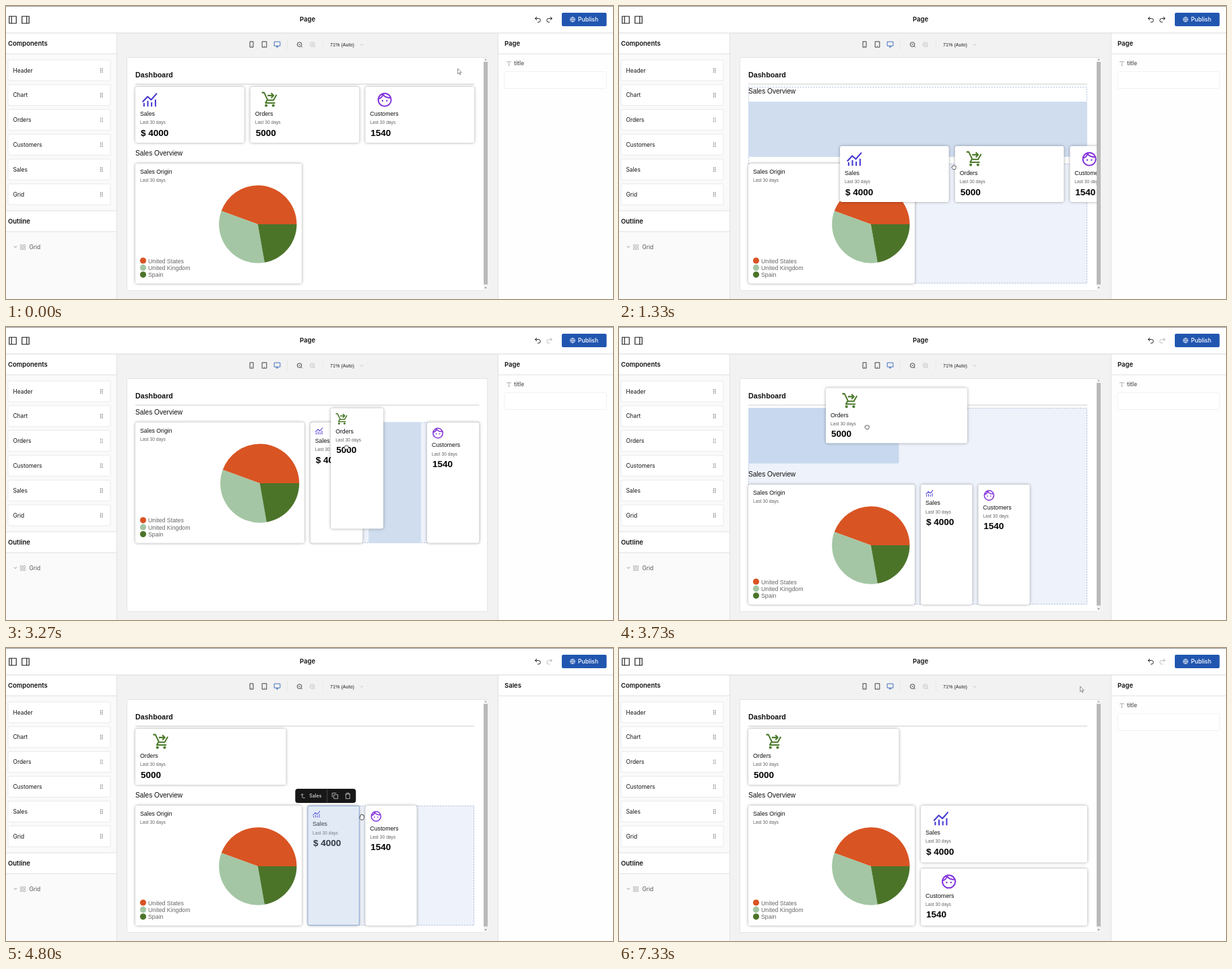
Animation, 901 px wide and 435 px high, one loop 7.54 s. Source, as an HTML page with a canvas:

```html
<!DOCTYPE html>
<html lang="en">
<head>
<meta charset="utf-8">
<title>Page editor</title>
<style>
html, body { margin: 0; width: 100%; height: 100%; overflow: hidden; background: #fff; }
canvas { display: block; width: 901px; height: 435px; }
</style>
</head>
<body>
<canvas id="stage"></canvas>
<script>
const LOOP = 7540;
const canvas = document.getElementById('stage');
const ratio = window.devicePixelRatio || 1;
canvas.width = Math.round(901 * ratio);
canvas.height = Math.round(435 * ratio);
const ctx = canvas.getContext('2d');
ctx.scale(ratio, ratio);

const UI = 'Inter, sans-serif';
const SITE = '"Liberation Sans", Arial, sans-serif';
const LEFT = 192, GAP = 9;

// Drawing helpers
function fill(x, y, w, h, color, radius = 0) {
  ctx.fillStyle = color;
  ctx.beginPath();
  ctx.roundRect(x, y, w, h, radius);
  ctx.fill();
}

function outline(x, y, w, h, color, radius = 0, width = 1, dash = []) {
  ctx.strokeStyle = color;
  ctx.lineWidth = width;
  ctx.setLineDash(dash);
  ctx.beginPath();
  ctx.roundRect(x, y, w, h, radius);
  ctx.stroke();
  ctx.setLineDash([]);
}

function disc(x, y, r, color) {
  ctx.fillStyle = color;
  ctx.beginPath();
  ctx.arc(x, y, r, 0, Math.PI * 2);
  ctx.fill();
}

// y is the middle of the capital letters
function text(string, x, y, size, { color = '#111', weight = 400, font = UI, align = 'left' } = {}) {
  ctx.font = `${weight} ${size}px ${font}`;
  ctx.fillStyle = color;
  ctx.textAlign = align;
  ctx.fillText(string, x, y + size * 0.36);
}

// Icons live on a 24 unit grid, centred on x, y
function icon(path, x, y, size, color, width = 2, inside) {
  ctx.save();
  ctx.translate(x - size / 2, y - size / 2);
  ctx.scale(size / 24, size / 24);
  ctx.lineJoin = 'round';
  if (inside) {
    ctx.fillStyle = inside;
    ctx.fill(new Path2D(path));
  }
  ctx.strokeStyle = color;
  ctx.lineWidth = width;
  ctx.stroke(new Path2D(path));
  ctx.restore();
}

const ICON = {
  panelLeft: 'M3 3h18v18H3zM9 3v18',
  panelRight: 'M3 3h18v18H3zM15 3v18',
  undo: 'M9 14L4 9l5-5M4 9h10a5.5 5.5 0 0 1 0 11h-3',
  redo: 'M15 14l5-5-5-5M20 9H10a5.5 5.5 0 0 0 0 11h3',
  globe: 'M2 12a10 10 0 1 0 20 0a10 10 0 1 0-20 0h20M12 2c-5 6-5 14 0 20c5-6 5-14 0-20',
  phone: 'M6 2h12v20H6zM11 18h2',
  tablet: 'M4 2h16v20H4zM11 18h2',
  monitor: 'M2 3h20v14H2zM8 21h8M12 17v4',
  zoomOut: 'M3 11a8 8 0 1 0 16 0a8 8 0 1 0-16 0M21 21l-4-4M8 11h6',
  zoomIn: 'M3 11a8 8 0 1 0 16 0a8 8 0 1 0-16 0M21 21l-4-4M8 11h6M11 8v6',
  down: 'M6 9l6 6 6-6',
  grid: 'M3 3h7v7H3zM14 3h7v7h-7zM14 14h7v7h-7zM3 14h7v7H3z',
  type: 'M4 7V4h16v3M9 20h6M12 4v16',
  hash: 'M4 9h16M4 15h16M10 3L8 21M16 3l-2 18',
  parent: 'M14 9L9 4 4 9M20 20h-7a4 4 0 0 1-4-4V4',
  copy: 'M8 8h14v14H8zM4 16H2V2h14v2',
  trash: 'M3 6h18M19 6v16H5V6M8 6V2h8v4',
  chart: 'M4 21.5v-5M9.3 21.5v-8M14.6 21.5v-6M20 21.5v-10M2 15L9 7.5l5 4.5L22 3',
  cart: 'M1 2h3.2l5 10.5h8L21.5 5M8.3 12.5L6.2 16.5H19.5M9 6h8M14 2.6l3.4 3.4-3.4 3.4M6 20a1 1 0 1 0 2 0a1 1 0 1 0-2 0M16 20a1 1 0 1 0 2 0a1 1 0 1 0-2 0',
  face: 'M3 12a9 9 0 1 0 18 0a9 9 0 1 0-18 0M4 10.5c2.5-.8 4.7-3 5.7-6M9.7 4.5c2 3.5 5 5 10.3 4.5M8 13.3h2M14 13.3h2',
  arrow: 'M5 1v19l4.5-4 3 7 3-1.5-3-6.5h6z',
  hand: 'M3 13l2-2 2 2V5h3V3h4v1h3v2h3v10l-3 6H9z',
  fist: 'M4 12l3-1V8l3-1h4l3 1 3 1v7l-3 5H9l-4-5z',
  beam: 'M8 2l4 2 4-2M12 4v16M8 22l4-2 4 2',
};

// Timeline
const DRAG_ROW = [740, 1800], DRAG_ORDERS = [2980, 4000];
const within = (t, [from, to]) => t >= from && t < to;

const POINTER = [
  [0, 671, 93], [70, 671, 93], [460, 480, 165], [740, 361, 151], [870, 361, 151],
  [1330, 497, 239], [1560, 572, 244], [1800, 572, 240], [2200, 508, 231], [2530, 508, 231],
  [2900, 561, 200], [3000, 561, 200], [3330, 500, 176], [3730, 368, 148], [4000, 262, 172],
  [4130, 262, 172], [4700, 524, 250], [4800, 528, 251], [4930, 528, 251], [5200, 441, 219],
  [5300, 441, 219], [5650, 765, 112], [5800, 765, 122], [6670, 765, 122], [7130, 685, 57], [LOOP, 685, 57],
];

function pointerAt(t) {
  const i = POINTER.findIndex(p => p[0] > t);
  const [t0, x0, y0] = POINTER[i - 1], [t1, x1, y1] = POINTER[i];
  const u = (t - t0) / (t1 - t0), k = u * u * (3 - 2 * u);
  return { x: x0 + (x1 - x0) * k, y: y0 + (y1 - y0) * k };
}

function selectionAt(t) {
  if (within(t, [2150, 2950]) || within(t, [4650, 5250])) return 'Sales';
  return within(t, [5250, 7130]) ? 'Grid' : 'Page';
}

const columnsAt = t => t < 5950 ? 3 : t < 6400 ? 2 : 1;

// Site content
const STATS = {
  Sales: { icon: ICON.chart, color: '#4438d2', value: '$ 4000', share: 0.2 },
  Orders: { icon: ICON.cart, color: '#4b7a2b', value: '5000', share: 0.3 },
  Customers: { icon: ICON.face, color: '#8434dc', value: '1540', share: 0.3 },
};

function panel(x, y, w, h) {
  ctx.save();
  ctx.shadowColor = 'rgba(0,0,0,.36)';
  ctx.shadowBlur = 4 * ratio;
  fill(x, y, w, h, '#fff', 3);
  ctx.restore();
}

function stat(name, { x, y, w, h }) {
  const { icon: path, color, value, share } = STATS[name];
  const slot = share * (w - 13), size = Math.min(25.5, slot), base = y + size;
  panel(x, y, w, h);
  icon(path, x + 6.5 + slot / 2, y + 6.5 + size / 2, size, color, 1.9);
  text(name, x + 7, base + 14.5, 8.75, { font: SITE });
  text('Last 30 days', x + 7, base + 27.5, 6.7, { font: SITE, color: '#666' });
  text(value, x + 8, base + 42.5, 13.5, { font: SITE, weight: 700, color: '#000' });
}

function pieCard(x, y, w, h) {
  panel(x, y, w, h);
  text('Sales Origin', x + 7, y + 12, 8.75, { font: SITE });
  text('Last 30 days', x + 7, y + 25, 6.7, { font: SITE, color: '#666' });
  const slices = [['United States', 160, '#d95423'], ['United Kingdom', 120, '#a4c6a4'], ['Spain', 80, '#4b7429']];
  const r = w * 0.2335, cx = x + w - 7.5 - r, cy = y + h / 2 + 1;
  let angle = 0;
  slices.forEach(([name, degrees, color], i) => {
    const end = angle - degrees * Math.PI / 180;
    ctx.fillStyle = color;
    ctx.beginPath();
    ctx.moveTo(cx, cy);
    ctx.arc(cx, cy, r, angle, end, true);
    ctx.fill();
    angle = end;
    const row = y + h - 34 + i * 10.4;
    disc(x + 11.5, row, 4.6, color);
    text(name, x + 19, row + 0.5, 8.8, { font: SITE, color: '#666' });
  });
}

function cells(x, y, w, h, columns, count) {
  const cw = (w - GAP * (columns - 1)) / columns;
  const rows = Math.ceil(count / columns), ch = (h - GAP * (rows - 1)) / rows;
  return Array.from({ length: count }, (_, i) => ({
    x: x + (i % columns) * (cw + GAP), y: y + Math.floor(i / columns) * (ch + GAP), w: cw, h: ch,
  }));
}

const holds = (box, p) => p.x >= box.x && p.x <= box.x + box.w && p.y >= box.y && p.y <= box.y + box.h;

function zone(x, y, w, h, filled = true) {
  if (filled) fill(x, y, w, h, '#eef2fa');
  outline(x + 0.5, y + 0.5, w - 1, h - 1, '#a3b7d6', 0, 0.9, [2, 2]);
}

function highlight({ x, y, w, h }) {
  fill(x, y, w, h, 'rgba(158,185,222,.3)', 2);
  outline(x, y + 0.5, w, h - 1, '#8fabd9', 2);
}

function actionBar(label, box) {
  const right = box.x + box.w - 5, y = box.y - 25;
  const width = label === 'Sales' ? 90 : 86, x = right - width, mid = y + 10.5;
  fill(x, y, width, 21, '#171717', 4);
  icon(ICON.parent, x + 11.5, mid, 9, '#ddd');
  text(label, x + 21, mid, 7, { color: '#ddd', weight: 500 });
  fill(right - 43, y + 1, 0.8, 19, '#555');
  icon(ICON.copy, right - 31, mid, 10, '#ccc');
  icon(ICON.trash, right - 12, mid, 10, '#ccc');
}

function site(t, pointer, selected) {
  const movingRow = within(t, DRAG_ROW), movingOrders = within(t, DRAG_ORDERS);
  const compact = within(t, [1500, 3420]);
  const below = within(t, [1060, 1500]);
  const right = compact ? 702.5 : 695, full = right - LEFT;
  const half = (full - GAP) / 2;
  const top = compact ? 141.4 : 234, height = compact ? 179.4 : 178;
  const inner = { x: LEFT + half + GAP, y: top, w: half, h: height };
  const names = Object.keys(STATS);

  fill(179, 76, 536, 347, '#fff');
  outline(179.5, 76.5, 535, 346, '#e4e4e4');
  ctx.save();
  ctx.beginPath();
  ctx.rect(179, 76, compact ? 536 : 530, 347);
  ctx.clip();

  text('Dashboard', LEFT, 102, 10.7, { font: SITE, weight: 700 });
  fill(LEFT, 115.5, full, 1, '#ccc');

  const dragging = movingRow || movingOrders;
  if (dragging && !compact) zone(LEFT, 120, full, 292, !below);
  if (below || (movingRow && compact)) zone(LEFT, top, full, height);
  const overInner = t > 1800 && (selected === 'Grid' || holds(inner, pointer));
  if (overInner && !(movingOrders && !compact)) {
    if (selected === 'Grid') fill(inner.x, inner.y, inner.w, inner.h, '#e9eff9');
    else zone(inner.x, inner.y, inner.w, inner.h);
  }

  text('Sales Overview', LEFT, compact || below ? 126.3 : 218, 10.1, { font: SITE });
  pieCard(LEFT, top, half, height);

  const slot = '#cfddef';
  let shown = [];
  if (t < DRAG_ROW[0]) {
    shown = cells(LEFT, 120, full, 83, 3, 3).map((box, i) => [names[i], box]);
  } else if (movingRow) {
    if (compact) fill(inner.x, inner.y, inner.w, inner.h, slot, 2);
    else fill(LEFT, below ? 142 : 120, full, 82, slot);
  } else if (compact) {
    shown = cells(inner.x, inner.y, inner.w, inner.h, 3, 3).map((box, i) => [names[i], box]);
    if (movingOrders) {
      const { x, y, w, h } = shown.splice(1, 1)[0][1];
      fill(x, y, w, h, slot, 2);
    }
  } else {
    const boxes = cells(inner.x, inner.y, inner.w, inner.h, columnsAt(t), 2);
    shown = [['Sales', boxes[0]], ['Customers', boxes[1]]];
    if (movingOrders) fill(LEFT, 120, 223.5, 82.5, '#c8d8ee', 2);
    else shown.push(['Orders', { x: LEFT, y: 120, w: 223.5, h: 83 }]);
  }
  shown.forEach(([name, box]) => stat(name, box));

  if (!dragging && selected === 'Page') {
    const hovered = shown.find(([, box]) => holds(box, pointer));
    if (hovered) highlight(hovered[1]);
  }
  if (selected === 'Sales') {
    const box = shown.find(([name]) => name === 'Sales')[1];
    highlight(box);
    actionBar('Sales', box);
  } else if (selected === 'Grid') {
    outline(inner.x + 0.5, inner.y + 0.5, inner.w - 1, inner.h - 1, '#8fabd9');
    actionBar('Grid', inner);
  }

  if (movingRow) {
    const dx = compact ? 84 : 169;
    cells(pointer.x - dx, pointer.y - 31, compact ? half : full, compact ? height : 83, 3, 3)
      .forEach((box, i) => stat(names[i], box));
  }
  if (movingOrders) {
    const [dx, w, h] = compact ? [23, 78, 179] : [61, 210, 82];
    stat('Orders', { x: pointer.x - dx, y: pointer.y - 57.5, w, h });
  }
  ctx.restore();

  if (!compact) {
    fill(709, 77, 6, 346, '#f4f4f4');
    fill(709, 83, 6, 330.5, '#b9b9b9');
    icon('M4 16h16l-8-9z', 712, 79.5, 4, '#888', 1, '#888');
    icon('M4 8h16l-8 9z', 712, 418.5, 4, '#555', 1, '#555');
  }
}

// Editor frame around the site
function header(t) {
  fill(0, 0, 901, 40, '#fff');
  fill(0, 0, 901, 1, '#999');
  fill(0, 39.5, 901, 1, '#dcdcdc');
  icon(ICON.panelLeft, 10, 20.5, 14, '#222');
  icon(ICON.panelRight, 29, 20.5, 14, '#222');
  text('Page', 447.5, 20, 9.5, { weight: 600, align: 'center' });
  icon(ICON.undo, 789.5, 20, 12, '#222');
  icon(ICON.redo, 806.5, 20, 12, t < DRAG_ROW[1] ? '#222' : '#bbb');
  fill(825, 10, 66.5, 20, '#2156b0', 2);
  icon(ICON.globe, 841, 20, 8.5, '#fff');
  text('Publish', 849, 20, 8.6, { color: '#fff', weight: 500 });
}

function toolbar() {
  icon(ICON.phone, 364.5, 57, 10, '#222');
  icon(ICON.tablet, 383.5, 57, 10, '#222');
  icon(ICON.monitor, 402.5, 57, 10.5, '#2e62b8');
  fill(417, 49, 1, 16, '#e9e9e9');
  icon(ICON.zoomOut, 436, 57.5, 10, '#222');
  icon(ICON.zoomIn, 455, 57.5, 10, '#bbb');
  fill(470, 49, 1, 16, '#e9e9e9');
  text('71% (Auto)', 481, 57.5, 7.2, { font: SITE, color: '#222' });
  icon(ICON.down, 528, 57.5, 8, '#aaa');
}

function sidebar() {
  fill(0, 40.5, 164, 394.5, '#fafafa');
  fill(164, 40.5, 1, 394.5, '#e2e2e2');
  fill(0, 40.5, 164, 30, '#fff');
  fill(0, 70.5, 164, 1, '#e2e2e2');
  text('Components', 3, 55.5, 9.5, { weight: 600 });
  ['Header', 'Chart', 'Orders', 'Customers', 'Sales', 'Grid'].forEach((name, i) => {
    const y = 80 + i * 36.8;
    fill(3, y, 152, 31, '#fff', 2);
    outline(3, y, 152, 31, '#eaeaea', 2);
    text(name, 10.5, y + 15.5, 8.4);
    for (let k = 0; k < 6; k++) disc(140.5 + (k % 2) * 2.5, y + 13 + Math.floor(k / 2) * 2.5, 0.7, '#555');
  });
  fill(0, 303.5, 164, 31, '#fff');
  fill(0, 303.5, 164, 1, '#e2e2e2');
  fill(0, 334.5, 164, 1, '#e2e2e2');
  text('Outline', 3, 320, 9.5, { weight: 600 });
  icon(ICON.down, 14, 357.5, 8, '#555');
  icon(ICON.grid, 25, 358, 9.5, '#aaa');
  text('Grid', 34.5, 358, 8.4, { color: '#555' });
}

function fields(t, selected) {
  fill(730, 40.5, 171, 394.5, '#fefefe');
  fill(730, 40.5, 1, 394.5, '#e2e2e2');
  fill(731, 40.5, 170, 30, '#fff');
  fill(731, 70.5, 170, 1, '#e2e2e2');
  text(selected, 740, 55.5, 9.5, { weight: 600 });
  if (selected === 'Sales') return;

  const numeric = selected === 'Grid', focused = numeric && t >= 5730;
  icon(numeric ? ICON.hash : ICON.type, 746.5, 85.5, 8.5, '#999');
  text(numeric ? 'columns' : 'title', 754, 85.5, 8.3, { color: '#666', weight: 600 });
  fill(740, 97, 151.5, 25.5, '#fff', 2);
  outline(740, 97.5, 151.5, 25, focused ? '#4a72b4' : '#f1f1f1', 2, focused ? 1.7 : 1);
  if (!numeric) return;
  text(columnsAt(t), 749.5, 110.5, 8.4, { font: SITE });
  if (focused) {
    fill(754, 105, 0.8, 11, '#111');
    fill(874.5, 105, 7, 10, '#eee', 1);
    icon('M7 10h10l-5-7zM7 14h10l-5 7z', 878, 110, 8, '#444', 1, '#444');
  }
}

function drawPointer(t, { x, y }) {
  if (within(t, DRAG_ROW) || within(t, DRAG_ORDERS)) icon(ICON.fist, x, y, 9.5, '#333', 2, '#fff');
  else if (x > 740 && y > 97 && y < 124) icon(ICON.beam, x, y, 9, '#444', 2);
  else if (x > LEFT && x < 703 && y > 118) icon(ICON.hand, x, y, 10, '#333', 2, '#fff');
  else icon(ICON.arrow, x + 2.5, y + 4.5, 10, '#666', 1.8, '#fff');
}

function draw(t) {
  const pointer = pointerAt(t), selected = selectionAt(t);
  fill(0, 0, 901, 435, '#f2f2f2');
  site(t, pointer, selected);
  toolbar();
  sidebar();
  fields(t, selected);
  header(t);
  drawPointer(t, pointer);
}

const start = performance.now();
function tick() {
  draw((performance.now() - start) % LOOP);
  requestAnimationFrame(tick);
}
tick();
</script>
</body>
</html>
```
